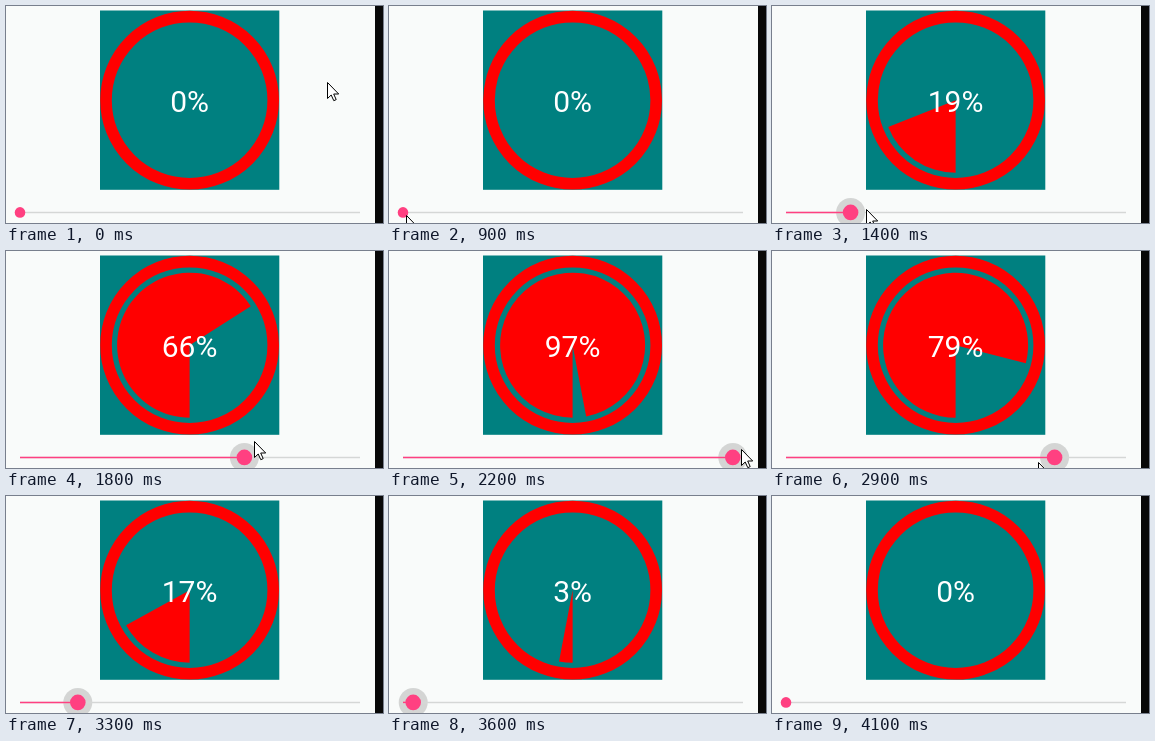
An HTML page for the animation above (4.7 s loop, 377 px wide and 217 px high).

```html
<!DOCTYPE html>
<html lang="en">
<head>
<meta charset="utf-8">
<title>Circular progress</title>
<style>
html, body { margin: 0; width: 100%; height: 100%; overflow: hidden; background: #f9fbfa; }
svg { display: block; width: 377px; height: 217px; }
text { font: 30px Roboto, sans-serif; fill: #fff; text-anchor: middle; }
</style>
</head>
<body>
<svg viewBox="0 0 377 217">
  <rect width="377" height="217" fill="#f9fbfa"/>
  <rect x="369" width="8" height="217" fill="#080808"/>
  <rect x="94" y="4.5" width="179.3" height="179.3" fill="#008080"/>
  <g transform="translate(183.6 94.2)">
    <circle r="83.6" fill="none" stroke="#f00" stroke-width="11.6"/>
    <path id="pie" fill="#f00"/>
    <text id="label" y="11.4"></text>
  </g>
  <circle id="ripple" cy="206.5" r="14.5"/>
  <path d="M14 206.4H354" stroke="#d5d7d6" stroke-width="1.5"/>
  <path id="track" stroke="#ff4081" stroke-width="1.5"/>
  <circle id="thumb" cy="206.4" fill="#ff4081"/>
  <path id="cursor" d="M.5 .5V16.5L4.2 13L6.8 18.7L9.2 17.6L6.7 12H11.7Z" fill="#fff" stroke="#000"/>
</svg>
<script>
const LOOP = 4700, STEP = 100;
const DRAG_START = 1100, DRAG_END = 3800, FADE = 300;
const el = id => document.getElementById(id);
const [pie, label, ripple, track, thumb, cursor] =
  ['pie', 'label', 'ripple', 'track', 'thumb', 'cursor'].map(el);
const clamp = v => Math.max(0, Math.min(1, v));

// [time, percent]
const drag = [
  [DRAG_START, 0], [1400, 19], [1800, 66], [2200, 97], [2300, 100],
  [2600, 100], [2900, 79], [3300, 17], [DRAG_END, 0]
];
// [time, x offset from the thumb, y]
const pointer = [
  [300, -13, 211], [600, 3, 209], [1100, 3, 209], [1400, 15, 203],
  [1800, 10, 190], [2300, 8, 199], [2600, 11, 199], [2900, -17, 211], [3500, 0, 218]
];

// Monotone cubic through the keys, level at both ends and around pauses
function smooth(keys, t, column = 1) {
  const secant = i => (keys[i + 1][column] - keys[i][column]) / (keys[i + 1][0] - keys[i][0]);
  const slope = i => {
    if (i === 0 || i === keys.length - 1) return 0;
    const a = secant(i - 1), b = secant(i);
    return a * b > 0 ? 2 * a * b / (a + b) : 0;
  };
  const found = keys.findIndex(key => key[0] > t);
  const i = found < 0 ? keys.length - 2 : Math.max(0, found - 1);
  const [from, to] = [keys[i], keys[i + 1]];
  const span = to[0] - from[0], u = clamp((t - from[0]) / span), v = 1 - u;
  return from[column] * v * v * (1 + 2 * u) + to[column] * u * u * (1 + 2 * v)
    + span * u * v * (slope(i) * v - slope(i + 1) * u);
}

// Clockwise sector starting at the bottom
function sector(percent) {
  if (percent <= 0) return '';
  const r = 72.5, angle = Math.min(percent / 100, .9999) * 2 * Math.PI;
  const x = -r * Math.sin(angle), y = r * Math.cos(angle);
  return `M0 0V${r}A${r} ${r} 0 ${+(percent > 50)} 1 ${x} ${y}Z`;
}

function render(time) {
  const t = Math.floor(time % LOOP / STEP) * STEP;
  const percent = Math.round(smooth(drag, t));
  const press = Math.min(clamp((t - DRAG_START) / STEP), clamp((DRAG_END + FADE - t) / FADE));
  const x = 14 + percent * 3.4;

  pie.setAttribute('d', sector(percent));
  label.textContent = percent + '%';
  track.setAttribute('d', percent ? `M14 206.4H${x}` : '');
  thumb.setAttribute('cx', x);
  thumb.setAttribute('r', 5.3 + 2.5 * press);
  ripple.setAttribute('cx', x);
  ripple.setAttribute('opacity', .15 * press);

  const resting = t < STEP;
  const cx = resting ? 321 : Math.round(x + smooth(pointer, t));
  const cy = resting ? 76 : Math.round(smooth(pointer, t, 2));
  cursor.setAttribute('visibility', resting || t >= pointer[0][0] ? 'visible' : 'hidden');
  cursor.setAttribute('transform', `translate(${cx} ${cy})`);
}

const start = performance.now();
function tick() {
  render(performance.now() - start);
  requestAnimationFrame(tick);
}
tick();
</script>
</body>
</html>
```
